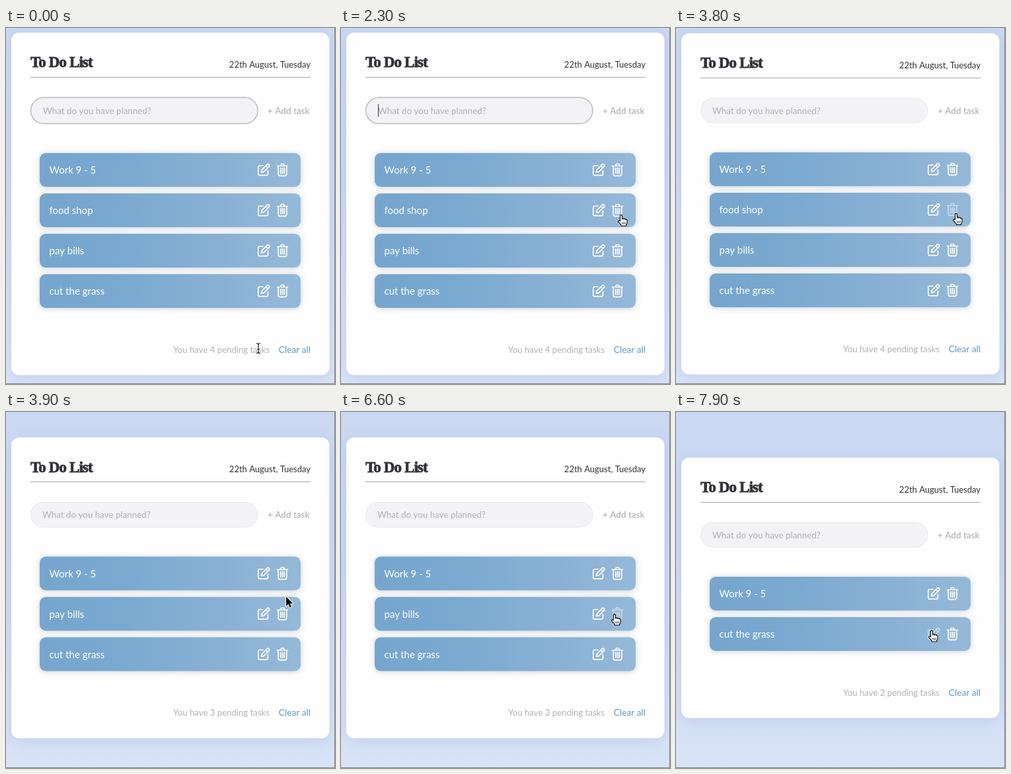
Animation of 498x538 px, one loop 8 s. Source, as an HTML page with a canvas:

```html
<!DOCTYPE html>
<html lang="en">
<head>
<meta charset="utf-8">
<title>To Do List</title>
<style>
  html, body { margin: 0; width: 100%; height: 100%; overflow: hidden; background: #d0dcf4; }
  canvas { display: block; width: 498px; height: 538px; }
</style>
</head>
<body>
<canvas id="stage"></canvas>
<script>
const W = 498, H = 538, LOOP = 8000, STEP = 100;
const BLUR = 3700, DELETE_FOOD = 3900, DELETE_BILLS = 7000;
const SANS = 'Lato, "Open Sans", sans-serif';
const canvas = document.getElementById('stage');
const ctx = canvas.getContext('2d');
const dpr = window.devicePixelRatio || 1;
canvas.width = Math.round(W * dpr);
canvas.height = Math.round(H * dpr);

// Pointer keys: time, x, y, shape
const pointer = [
  [0, 382, 484, 'beam'],
  [500, 404, 486, 'arrow'],
  [600, 414, 483, 'hand'],
  [900, 423, 481, 'hand'],
  [1000, 423, 481, 'hand'],
  [1200, 422, 480, 'hand'],
  [1400, 422, 480, 'hand'],
  [1500, 421, 480, 'hand'],
  [1600, 421, 480, 'hand'],
  [1800, 422, 448, 'arrow'],
  [2200, 424, 284, 'hand'],
  [2300, 424, 281, 'hand'],
  [2500, 424, 281, 'hand'],
  [2700, 424, 406, 'hand'],
  [2800, 422, 230, 'arrow'],
  [2900, 420, 53, 'arrow'],
  [3100, 424, 276, 'hand'],
  [3200, 424, 280, 'hand'],
  [DELETE_FOOD, 424, 279, 'arrow'],
  [4300, 424, 279, 'arrow'],
  [4800, 288, 181, 'arrow'],
  [5900, 288, 181, 'arrow'],
  [6500, 413, 303, 'hand'],
  [6600, 414, 304, 'hand'],
  [DELETE_BILLS, 414, 304, 'arrow'],
  [7300, 414, 304, 'arrow'],
  [7700, 390, 326, 'hand'],
  [7900, 387, 329, 'hand']
];

const editIcon = new Path2D(
  'M-1 -6.5H-5.7Q-8.2 -6.5 -8.2 -4V5.7Q-8.2 8.2 -5.7 8.2H4Q6.5 8.2 6.5 5.7V1' +
  'M-3.5 3.5L-2.7 -.1L5.5 -8.3Q6.6 -9.3 7.7 -8.3L8.5 -7.5Q9.5 -6.4 8.5 -5.3L.2 2.8Z' +
  'M3.6 -6.2L6.6 -3.2');
const trashIcon = new Path2D(
  'M-8 -6H8M-3.2 -6L-1.9 -9H1.9L3.2 -6' +
  'M-6.3 -6V6.5Q-6.3 8.8 -4 8.8H4Q6.3 8.8 6.3 6.5V-6' +
  'M-2.8 -2.6V5.2M0 -2.6V5.2M2.8 -2.6V5.2');
const shapes = {
  arrow: new Path2D('M0 0V14.6L3.4 11.4L5.6 16.4L8.1 15.3L5.9 10.4H10.4Z'),
  beam: new Path2D('M-3 -7.5Q0 -7.5 0 -5.5Q0 -7.5 3 -7.5M0 -5.5V5.5M-3 7.5Q0 7.5 0 5.5Q0 7.5 3 7.5M-1.5 1.5H1.5'),
  hand: new Path2D('M-1.5 10.5V2.8a1.5 1.5 0 0 1 3 0V8a1.3 1.3 0 0 1 2.6 .3a1.3 1.3 0 0 1 2.6 .5' +
    'a1.3 1.3 0 0 1 2.4 .7V13q0 2 -1.5 3.5V18H.6q-1 -2.5 -4.4 -5.6q-1.3 -1.5 .2 -2.2q1.2 -.3 2.1 .3Z'),
  knuckles: new Path2D('M1.8 12.5V15.5M3.9 12.5V15.5M6 12.5V15.5')
};

const clamp = v => Math.max(0, Math.min(1, v));
const smooth = v => v * v * (3 - 2 * v);
const hover = (t, from, to, ms = 150) => clamp((t - from) / ms) - clamp((t - to) / ms);

function text(str, x, y, size, color, { align = 'left', weight = 400 } = {}) {
  ctx.font = `${weight} ${size}px ${SANS}`;
  ctx.fillStyle = color;
  ctx.textAlign = align;
  ctx.fillText(str, x, y);
}

function box(x, y, w, h, r, fill, shadow) {
  ctx.save();
  if (shadow) {
    ctx.shadowColor = shadow[0];
    ctx.shadowBlur = shadow[1] * dpr;
    ctx.shadowOffsetY = shadow[2] * dpr;
  }
  ctx.beginPath();
  ctx.roundRect(x, y, w, h, r);
  ctx.fillStyle = fill;
  ctx.fill();
  ctx.restore();
}

function gradient(x, y, stops) {
  const g = ctx.createLinearGradient(0, 0, x, y);
  stops.forEach((c, i) => g.addColorStop(i / (stops.length - 1), c));
  return g;
}

function icon(path, x, y, alpha) {
  ctx.save();
  ctx.translate(x, y);
  ctx.globalAlpha = alpha;
  ctx.strokeStyle = '#fff';
  ctx.lineWidth = 1.7;
  ctx.lineCap = ctx.lineJoin = 'round';
  ctx.stroke(path);
  ctx.restore();
}

function drawTitle(y) {
  ctx.save();
  ctx.font = 'bold 23px "Liberation Serif", serif';
  ctx.letterSpacing = '-0.9px';
  ctx.textAlign = 'left';
  ctx.fillStyle = ctx.strokeStyle = '#333238';
  ctx.lineWidth = 0.8;
  ctx.fillText('To Do List', 37, y);
  ctx.strokeText('To Do List', 37, y);
  ctx.restore();
}

function drawInput(t, top, focused) {
  const y = top + 97.5, h = focused ? 40.5 : 38.5;
  box(37, y, 344.5, h, h / 2, '#f3f3f6');
  ctx.strokeStyle = focused ? '#bcbcbe' : '#ebebee';
  ctx.lineWidth = focused ? 1.5 : 1;
  ctx.beginPath();
  ctx.roundRect(37.5, y + .5, 343.5, h - 1, h / 2);
  ctx.stroke();
  const base = top + (focused ? 122.5 : 121.5);
  text('What do you have planned?', focused ? 56 : 55, base, 13.4, '#b2b2b4');
  text('+ Add task', 396, base, 13.5, '#b4b4b6', { weight: 600 });
  const blinkOn = t >= 200 && Math.floor((t - 200) / 500) % 2 === 0;
  if (focused && blinkOn) {
    ctx.fillStyle = '#333';
    ctx.fillRect(56, top + 108, 1, 19);
  }
}

function drawTask(name, y, editHover, trashHover) {
  box(51, y, 395, 51, 9, gradient(W, 0, ['#74a4cd', '#79a9d0', '#8ab1d4', '#9abcda']),
    ['rgba(40,60,90,0.24)', 8, 1]);
  text(name, 65.5, y + 31, 15, '#fff');
  icon(editIcon, 390, y + 25.5, 1 - .5 * editHover);
  icon(trashIcon, 418.5, y + 25.5, 1 - .5 * trashHover);
}

function drawPointer(t) {
  let i = pointer.length - 1;
  while (pointer[i][0] > t) i--;
  const a = pointer[i], b = pointer[i + 1] || a;
  const p = b === a ? 0 : smooth((t - a[0]) / (b[0] - a[0]));
  const kind = a[3], path = shapes[kind];
  ctx.save();
  ctx.translate(a[1] + (b[1] - a[1]) * p, a[2] + (b[2] - a[2]) * p);
  ctx.lineJoin = 'round';
  if (kind === 'hand') {
    ctx.fillStyle = '#fff';
    ctx.strokeStyle = '#111';
    ctx.lineWidth = 1.2;
    ctx.fill(path);
    ctx.stroke(path);
    ctx.lineWidth = .9;
    ctx.stroke(shapes.knuckles);
  } else {
    ctx.strokeStyle = '#fff';
    ctx.lineWidth = kind === 'beam' ? 2.8 : 2;
    ctx.stroke(path);
    ctx.fillStyle = ctx.strokeStyle = '#0a0a0a';
    ctx.lineWidth = 1.2;
    if (kind === 'beam') ctx.stroke(path);
    else ctx.fill(path);
  }
  ctx.restore();
}

function draw(t) {
  ctx.setTransform(dpr, 0, 0, dpr, 0, 0);
  ctx.fillStyle = gradient(0, H, ['#cad8f2', '#cfdbf4', '#d8e3f6']);
  ctx.fillRect(0, 0, W, H);

  const focused = t < BLUR;
  const tasks = ['Work 9 - 5', 'food shop', 'pay bills', 'cut the grass'].filter(name =>
    !(name === 'food shop' && t >= DELETE_FOOD) && !(name === 'pay bills' && t >= DELETE_BILLS));
  const gone = 4 - tasks.length;
  const grow = focused ? 2 : 0;
  const top = 8 + 30.5 * gone - grow / 2;

  box(8, top, 481.5, 515.5 - 61 * gone + grow, 12, '#fefefe', ['rgba(90,120,190,0.16)', 24, 6]);
  drawTitle(top + 52);
  text('22th August, Tuesday', 461, top + 52.5, 13, '#333238', { align: 'right' });
  ctx.fillStyle = '#a9a9ab';
  ctx.fillRect(37, Math.floor(top + 67), 424, 1);
  drawInput(t, top, focused);

  const trashHover = {
    'food shop': hover(t, 2300, 2500) + hover(t, 3050, DELETE_FOOD),
    'pay bills': hover(t, 6450, DELETE_BILLS)
  };
  tasks.forEach((name, i) => drawTask(name, top + 180 + grow + 61 * i,
    name === 'cut the grass' ? hover(t, 7700, LOOP) : 0, trashHover[name] || 0));

  const foot = top + 481.5 + grow - 61 * gone;
  text(`You have ${tasks.length} pending tasks`, 399, foot, 13.2, '#b2b2b4', { align: 'right' });
  ctx.globalAlpha = 1 - .4 * hover(t, 600, 1800);
  text('Clear all', 461, foot, 13.7, '#5f97c5', { align: 'right' });
  ctx.globalAlpha = 1;

  ctx.fillStyle = '#85898f';
  ctx.fillRect(0, H - 1, W, 1);
  ctx.fillRect(W - 1, 0, 1, H);
  drawPointer(t);
}

const start = performance.now();
function tick() {
  const t = (performance.now() - start) % LOOP;
  draw(Math.floor(t / STEP) * STEP);
  requestAnimationFrame(tick);
}
tick();
</script>
</body>
</html>
```
